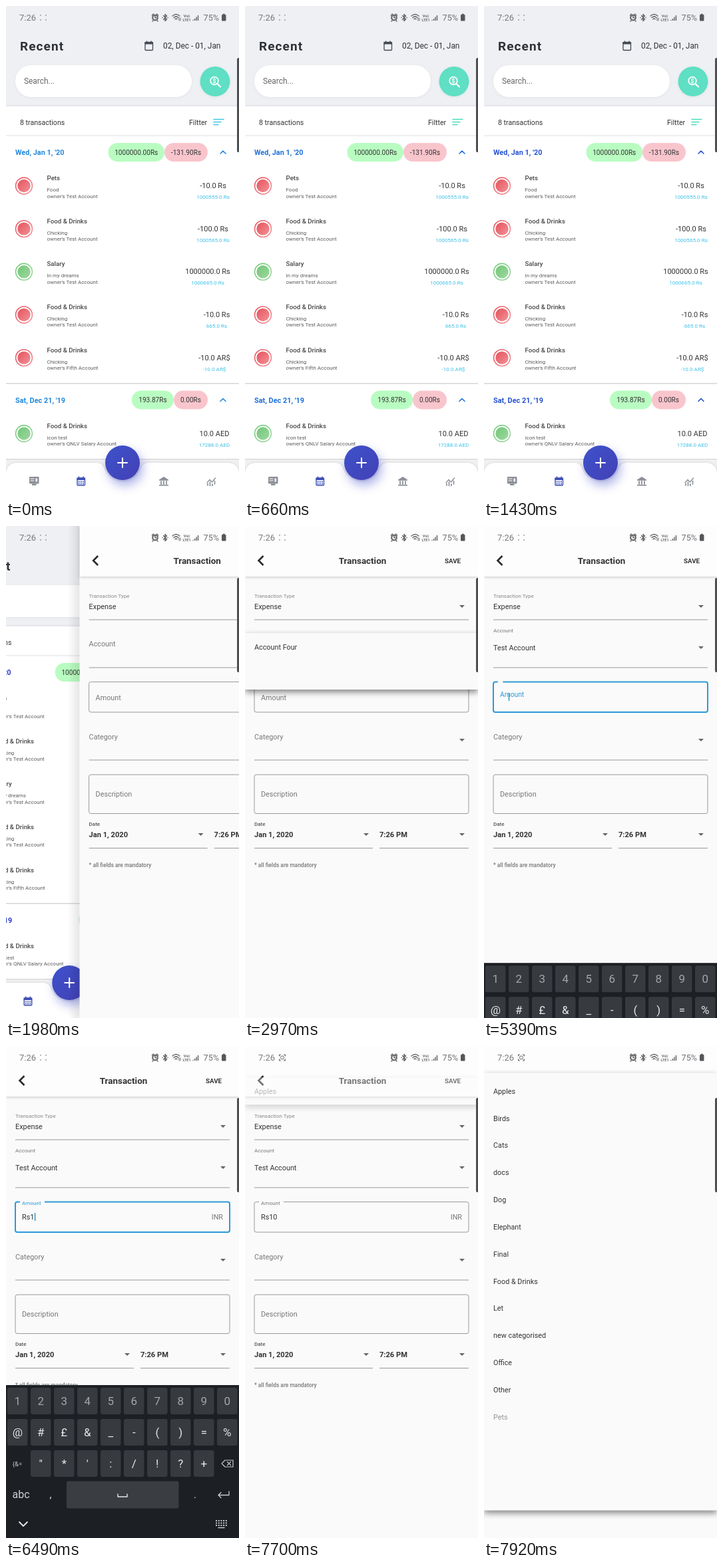
Write an HTML page that moves like this. It is 350 px wide and 740 px high and loops after 8 s.

```html
<!DOCTYPE html>
<html lang="en">
<head>
<meta charset="utf-8">
<title>Expense tracker</title>
<style>
  html, body { margin: 0; width: 100%; height: 100%; overflow: hidden; background: #fafafa; }
  svg { display: block; width: 350px; height: 740px; font-family: Roboto, Arial, sans-serif; }
  text { white-space: pre; }
  .date { fill: var(--date); }
  .dateLine { stroke: var(--date); }
  .line { fill: none; stroke-linecap: round; stroke-linejoin: round; }
  .lift { filter: drop-shadow(0 1px 2px #0003); }
  .soft { filter: drop-shadow(0 1px 2px #0000000d); }
  .sheet { filter: drop-shadow(0 4px 5px #0007); }
  .fab { filter: drop-shadow(4px 8px 8px #4a55cc77); }
</style>
</head>
<body>
<svg id="stage" viewBox="0 0 350 740">
  <defs>
    <linearGradient id="edge"><stop offset="0" stop-opacity="0"/><stop offset="1" stop-opacity=".1"/></linearGradient>
    <linearGradient id="fabFill" x2="1" y2="1"><stop stop-color="#3d52cc"/><stop offset="1" stop-color="#4440b4"/></linearGradient>
    <linearGradient id="red" x2="1" y2="1"><stop stop-color="#e4525c"/><stop offset="1" stop-color="#f39298"/></linearGradient>
    <linearGradient id="green" x2="1" y2="1"><stop stop-color="#72c777"/><stop offset="1" stop-color="#9ed8a0"/></linearGradient>
  </defs>
</svg>
<script>
const LOOP = 8000, TICK = 110, ROW = 40.83, PAD = 6.8;
const INK = '#333', GREY = '#777', BLUE = '#2b9ad6';
const stage = document.getElementById('stage');

const clamp = v => Math.min(1, Math.max(0, v));
const lerp = (a, b, p) => a + (b - a) * p;
const ramp = (t, start, length) => clamp((t - start) / length);
const easeOut = p => 1 - (1 - p) ** 2;

function bezier(x1, y1, x2, y2) {
  const at = (a, b, s) => 3 * (1 - s) ** 2 * s * a + 3 * (1 - s) * s * s * b + s ** 3;
  return x => {
    let lo = 0, hi = 1;
    for (let i = 0; i < 24; i++) {
      const mid = (lo + hi) / 2;
      if (at(x1, x2, mid) < x) lo = mid; else hi = mid;
    }
    return at(y1, y2, hi);
  };
}
const pageEase = bezier(.35, .91, .33, .97);

// Drawing helpers
const text = (x, y, str, size, fill = INK, weight = 400, extra = '') =>
  `<text x="${x}" y="${y}" font-size="${size}" fill="${fill}" font-weight="${weight}" ${extra}>${str.replace(/&/g, '&amp;')}</text>`;
const mid = (x, y, str, size, fill, weight, extra = '') =>
  text(x, y, str, size, fill, weight, 'text-anchor="middle" ' + extra);
const rect = (x, y, w, h, fill, r = 0, extra = '') =>
  `<rect x="${x}" y="${y}" width="${w}" height="${h}" fill="${fill}" rx="${r}" ${extra}/>`;
const disc = (x, y, r, fill, extra = '') => `<circle cx="${x}" cy="${y}" r="${r}" fill="${fill}" ${extra}/>`;
const line = (d, stroke, w = 1, extra = '') =>
  `<path class="line" d="${d}" stroke="${stroke}" stroke-width="${w}" ${extra}/>`;
const rule = (x1, x2, y, color = '#999') => rect(x1, y - .5, x2 - x1, 1, color);
const arrow = (x, y) => `<path d="M${x - 4} ${y - 2}h8l-4 4z" fill="#666"/>`;
const group = (id, body, extra = '') => `<g id="${id}" ${extra}>${body}</g>`;

// Home page
function entry(y, color, title, note, account, amount, balance, cx) {
  return disc(27, y + 12, 12.4, '#fff', `stroke="url(#${color})" stroke-width="1.6"`) +
    disc(27, y + 12, 9.7, `url(#${color})`) +
    text(61.5, y + 3.5, title, 9.7, '#484848', 500) +
    text(61.5, y + 20.5, note, 8, '#5c5c5c') +
    text(61.5, y + 30, account, 8, '#5c5c5c') +
    mid(cx, y + 15.5, amount, 11) +
    mid(cx, y + 31.5, balance, 8.1, '#3cc0e6');
}

function dayHead(y, day, left, split, right, income, spent) {
  return `<text class="date" x="14" y="${y + 4}" font-size="10.9" font-weight="700">${day}</text>` +
    rect(left, y - 14, split - left, 28, '#b9fcc1', 14) +
    rect(split, y - 14, right - split, 28, '#f9c5cd', 14) +
    mid((left + split) / 2, y + 3.5, income, 10.1) +
    mid((split + right) / 2, y + 3.5, spent, 10.1) +
    `<path class="line dateLine" d="M322 ${y + 2}l4-4 4 4" stroke-width="1.6"/>`;
}

function navIcons() {
  const g = '#8b8f96', b = '#3f51b5', butt = 'style="stroke-linecap:butt"';
  return rect(35, 708, 14.5, 10.5, g, 1) + line('M37 711h5M37 714h5', '#fff', 1) +
    rect(44.5, 710.5, 2.5, 5, '#fff') + rect(39, 718.5, 6.5, 2.5, g) +
    rect(107, 710, 11.5, 11, '#fff', 1, `stroke="${b}" stroke-width="1.4"`) + rect(106.5, 709.5, 12.5, 3.6, b) +
    line('M109.500 708v2M116 708v2', b, 1.4) +
    line('M108.600 715.600h9M108.600 718.600h9', b, 1.9, 'stroke-dasharray="2 1.2" ' + butt) +
    `<path d="M230 712.5l7-4.5 7 4.5v1.2h-14z" fill="${g}"/>` +
    line('M233 715v4M237 715v4M241 715v4', g, 1.8) + rect(230, 720, 14, 1.6, g) +
    line('M302 717l4-4.500 3.500 3.500 5-6', g, 1.4) +
    line('M303 718.500v2.500M306.500 716v5.500M310 719v2.500M313.500 714.500v4.500', g, 1.7);
}

function home() {
  const rows = [
    ['red', 'Pets', 'Food', "owner's Test Account", '-10.0 Rs', '1000555.0 Rs', 311],
    ['red', 'Food & Drinks', 'Chicking', "owner's Test Account", '-100.0 Rs', '1000565.0 Rs', 311],
    ['green', 'Salary', 'In my dreams', "owner's Test Account", '1000000.0 Rs', '1000665.0 Rs', 303],
    ['red', 'Food & Drinks', 'Chicking', "owner's Test Account", '-10.0 Rs', '665.0 Rs', 316.5],
    ['red', 'Food & Drinks', 'Chicking', "owner's Fifth Account", '-10.0 AR$', '-10.0 AR$', 313],
  ];
  return rect(0, 0, 350, 740, '#eef0f3') +
    text(21, 67, 'Recent', 19, '#2f3238', 700, 'letter-spacing="1.1"') +
    rect(209, 54.5, 11.5, 12, 'none', 1, 'stroke="#444a55" stroke-width="1.3"') + rect(208.5, 54, 12.5, 3.5, '#444a55') +
    line('M211.500 53v2M218 53v2', '#444a55', 1.3) +
    text(236, 63.5, '02, Dec - 01, Jan', 11.9) +
    rect(14, 89, 265, 48, '#fff', 24, 'class="soft"') +
    text(27, 117, 'Search...', 11.9, '#666') +
    disc(314, 113.5, 22.5, '#5fdfc4', 'class="soft"') +
    disc(313, 112.5, 5.8, 'none', 'stroke="#fff" stroke-width="1.8"') +
    line('M317.500 117l4.500 4.500', '#fff', 2.2) + mid(313, 115.6, '$', 8.5, '#fff', 700) +
    rect(0, 151, 350, 589, '#fff', 0, 'class="lift"') + rule(0, 350, 195, '#e0e0e0') +
    text(21, 178.5, '8 transactions', 10.6) + text(275, 178.5, 'Filtter', 10.6) +
    line('M312 170.500h15M312 174.500h11M312 178.500h7', 'var(--filter)', 1.5) +
    dayHead(220, "Wed, Jan 1, '20", 153.5, 238, 303, '1000000.00Rs', '-131.90Rs') +
    rows.map((r, i) => entry(258.5 + i * 64.65, ...r)).join('') +
    rect(0, 567, 350, 1.5, '#d6d6d8') +
    dayHead(592.5, "Sat, Dec 21, '19", 189, 252, 303, '193.87Rs', '0.00Rs') +
    entry(631, 'green', 'Food & Drinks', 'icon test', "owner's QNLV Salary Account", '10.0 AED', '17288.0 AED', 313) +
    rect(0, 681, 350, 1.5, '#d6d6d8') + rect(0, 683, 350, 57, '#f1f1f3') +
    `<path class="lift" fill="#fff" d="M0 740V705Q0 687 18 687H136Q145 687 148 697A29 29 0 0 0 202 697Q205 687 214 687H332Q350 687 350 705V740Z"/>` +
    navIcons() + disc(175, 687, 26, 'url(#fabFill)', 'class="fab"') +
    line('M168 687h14M175 680v14', '#fff', 2);
}

// Form page
function form() {
  const box = 'stroke="#999" stroke-width="1"';
  return rect(-18, 0, 18, 740, 'url(#edge)') + rect(0, 0, 350, 740, '#fafafa') +
    rect(0, 0, 350, 76, '#fdfdfd', 0, 'class="lift"') +
    line('M27.500 45l-7 7 7 7', '#2a2a2a', 2.6, 'style="stroke-linecap:butt;stroke-linejoin:miter"') +
    mid(176.5, 56.5, 'Transaction', 13.4, INK, 700) + mid(312, 55.5, 'SAVE', 9.8, INK, 700) +
    text(14, 107.5, 'Transaction Type', 8, '#888') + text(14, 125, 'Expense', 10.9) + arrow(326, 121) + rule(14, 336, 141) +
    group('accountLabel', text(0, 0, 'Account', 10.8, GREY)) +
    group('accountValue', text(14, 187, 'Test Account', 10.8)) + arrow(326, 183) + rule(14, 336, 213) +
    rect(14, 234.5, 322, 45.5, 'none', 3, box + ' id="amountBox"') +
    rect(21, 232, 37, 5, '#fafafa', 0, 'id="gap"') +
    group('amountLabel', text(0, 0, 'Amount', 10.8, 'inherit')) +
    group('amount', `<text id="value" x="24" y="261" font-size="10.8" fill="${INK}"></text>` +
      text(326, 261, 'INR', 10.8, GREY, 400, 'text-anchor="end"')) +
    rect(0, 251, 1.5, 12, BLUE, 0, 'id="caret"') +
    text(14, 320.5, 'Category', 10.8, GREY) + arrow(326, 322) + rule(14, 336, 352) +
    rect(14, 374, 322, 58.5, 'none', 3, box) + text(24, 407, 'Description', 10.8, GREY) +
    text(14, 451, 'Date', 8, '#555', 500) + text(14, 468, 'Jan 1, 2020', 11.1, INK, 700) + arrow(182, 464) +
    text(202, 468, '7:26 PM', 11.1, INK, 700) + arrow(326, 464) + rule(14, 192, 484.5) + rule(202, 336, 484.5) +
    text(14, 512.5, '* all fields are mandatory', 8.4, '#777', 500);
}

// Keyboard
function keyboard() {
  const keys = [...'1234567890'], marks = [...'@#£&_-()=%'], more = [..."\"*':/!?+"];
  const key = (c, col, y, color, size) => {
    const x = 2 + col * 35;
    return rect(x, y, 30.5, 40, '#373a3f', 3) + mid(x + 15.3, y + 25.5, c, size, color, 400);
  };
  const w = '#e6e7e8';
  return rect(0, 510, 350, 230, '#1c1f23') +
    keys.map((c, i) => key(c, i, 514, '#a3a6a9', 17)).join('') +
    marks.map((c, i) => key(c, i, 561, w, 17)).join('') +
    more.map((c, i) => key(c, i + 1, 608, w, 17)).join('') +
    mid(17, 631.5, '{&=', 9.5, '#c8cacc', 400) +
    line('M324 628l5-5h12v10h-12zM332.500 625.500l5 5M337.500 625.500l-5 5', '#c8cacc', 1.2) +
    mid(22.5, 680, 'abc', 16, '#d0d2d4', 400) + mid(67, 680, ',', 15, w, 400) + mid(284, 680, '.', 15, w, 400) +
    rect(91, 654.5, 168.5, 41, '#3a3d42', 3) + line('M168 674v4h14v-4', w, 1.4) +
    line('M335 670v5.500h-16M323 671.500l-4 4 4 4', '#c8cacc', 1.3) +
    line('M20 716l6 6 6-6', w, 1.8) +
    [714, 717.5, 721].map(y => line(`M315 ${y}h17`, '#c8cacc', 2, 'stroke-dasharray="2 1.7" style="stroke-linecap:butt"')).join('') +
    line('M319 724.500h9', '#c8cacc', 1.5);
}

// Status bar and side handle
function status() {
  const g = '#66686b';
  return text(20, 22, '7:26', 13, '#77797c') +
    line('M52 13.500v.8M60 13.500v.8M52 20.500v.8M60 20.500v.8', '#8a8c8f', 1.4) +
    group('focus', disc(56, 17.4, 2.5, 'none', `stroke="${g}"`) + line('M51.500 15v-2h2M58.500 13h2v2M51.500 20v2h2M58.500 22h2v-2', g, 1)) +
    disc(224, 17.5, 3.8, 'none', `stroke="${g}" stroke-width="2.2"`) + line('M219.500 14l2-2M228.500 14l-2-2M224 15.500v2.300h1.600M221 22l-1 1M227 22l1 1', g, 1.6) +
    line('M236.500 14.500l5 5.500-2.500 2.500v-10l2.500 2.500-5 5.500M235 17.500h.2M243 17.500h.2', g, 1.5) +
    line('M250 15q5.500-5 11 0M252 17.500q3.500-3.300 7 0M254 19.800q1.500-1.500 3 0', g, 1.5) + line('M260 18v4M262 22v-4', g, 1) +
    mid(271.5, 16.5, 'Vo)', 6, g, 700) + mid(271.5, 22.5, 'LTE1', 5.5, g, 700) +
    line('M281 22v-1M283.500 22v-3M286 22v-5.500M288.500 22v-8', g, 1.5, 'style="stroke-linecap:butt"') +
    text(296.5, 22, '75%', 12.7, '#6f7174') + rect(324, 13, 6.5, 9.5, '#55575a', 1) + rect(325.7, 11.7, 3, 2, '#55575a') +
    rect(347, 78, 6, 142, '#4d4f52', 2.5);
}

// Dropdown sheets
function dropdown(id, top, height, count, items) {
  const first = top + PAD + ROW / 2 + 4;
  const body = rect(0, top, 350, height, '#fafafa', 1, 'class="sheet"') +
    items.map((s, i) => text(14, first + i * ROW, s, 10.8)).join('');
  const unit = .5 / (count + 1.5);
  return {
    markup: group(id, body),
    show(p, fade) {
      const el = document.getElementById(id), grow = ramp(p, .25, .25);
      const y = lerp(PAD, 0, grow);
      el.setAttribute('opacity', clamp(p / .25) * fade);
      el.firstChild.setAttribute('y', top + y);
      el.firstChild.setAttribute('height', lerp(PAD + ROW, height, grow) - y);
      el.querySelectorAll('text').forEach((t, i) =>
        t.setAttribute('opacity', i ? ramp(p, .5 + (i + 1) * unit, 1.5 * unit) : 1));
    }
  };
}
const accounts = dropdown('accounts', 155, 422, 10, ['Account Four', 'QNLV Salary Account', 'Fifth Account',
  'First Test Account', 'XZT', 'Second Test Account', 'Test 3 Account', 'Test Account', 'Third tests', 'UAE Wallet']);
const categories = dropdown('categories', 40.5, 658, 20, ['Apples', 'Birds', 'Cats', 'docs', 'Dog', 'Elephant',
  'Final', 'Food & Drinks', 'Let', 'new categorised', 'Office', 'Other', 'Pets']);

stage.insertAdjacentHTML('beforeend', group('home', home()) + group('form', form()) +
  accounts.markup + categories.markup + group('keys', keyboard()) + status());

const $ = id => document.getElementById(id);
const set = (id, attrs) => { for (const k in attrs) $(id).setAttribute(k, attrs[k]); };
const tint = (a, b, p) => `rgb(${a.map((v, i) => Math.round(lerp(v, b[i], p)))})`;
const SKY = [34, 136, 222], AZURE = [30, 112, 218], INDIGO = [42, 60, 208];

function draw(t) {
  const date = t < 660 ? tint(SKY, AZURE, t / 660) : tint(AZURE, INDIGO, ramp(t, 660, 1320));
  stage.style.setProperty('--date', date);
  stage.style.setProperty('--filter', tint([62, 200, 226], [72, 220, 186], ramp(t, 0, 660)));

  const slide = pageEase(ramp(t, 1868, 400));
  set('home', { transform: `translate(${-350 / 3 * slide})` });
  set('form', { transform: `translate(${350 * (1 - slide)})`, visibility: t > 1868 ? 'visible' : 'hidden' });

  accounts.show(ramp(t, 2886.3, 300), 1 - ramp(t, 4800, 75));
  categories.show(ramp(t, 7674, 300), 1);

  const picked = ramp(t, 4800, 200);
  set('accountLabel', { transform: `translate(14 ${lerp(181, 159.5, picked)}) scale(${lerp(1, .75, picked)})` });
  set('accountValue', { opacity: t > 4800 ? 1 : 0 });

  const floated = ramp(t, 5350, 200), focused = t >= 5390 && t < 7480;
  const typed = t < 6380 ? '' : t < 6710 ? '1' : '10';
  set('amountLabel', { transform: `translate(24 ${lerp(261.5, 238.5, floated)}) scale(${lerp(1, .75, floated)})` });
  $('amountLabel').firstChild.setAttribute('fill', focused ? BLUE : GREY);
  set('amountBox', { stroke: focused ? BLUE : '#999', 'stroke-width': focused ? 2 : 1 });
  set('gap', { width: 37 * floated });
  set('amount', { opacity: ramp(floated, .5, .5) });
  $('value').textContent = 'Rs' + typed;
  const blink = Math.floor((t - 5390) / 500) % 2 === 0;
  set('caret', { x: 36.8 + 6.07 * typed.length, opacity: focused && blink ? 1 : 0 });

  const raised = easeOut(ramp(t, 5340, 250)) - ramp(t, 7420, 200);
  set('keys', { transform: `translate(0 ${230 * (1 - raised)})` });
  set('focus', { opacity: t >= 7700 ? 1 : 0 });
}

const start = performance.now();
function loop(now) {
  const t = Math.max(0, now - start) % LOOP;
  draw(Math.floor(t / TICK) * TICK);
  requestAnimationFrame(loop);
}
draw(0);
requestAnimationFrame(loop);
</script>
</body>
</html>
```
